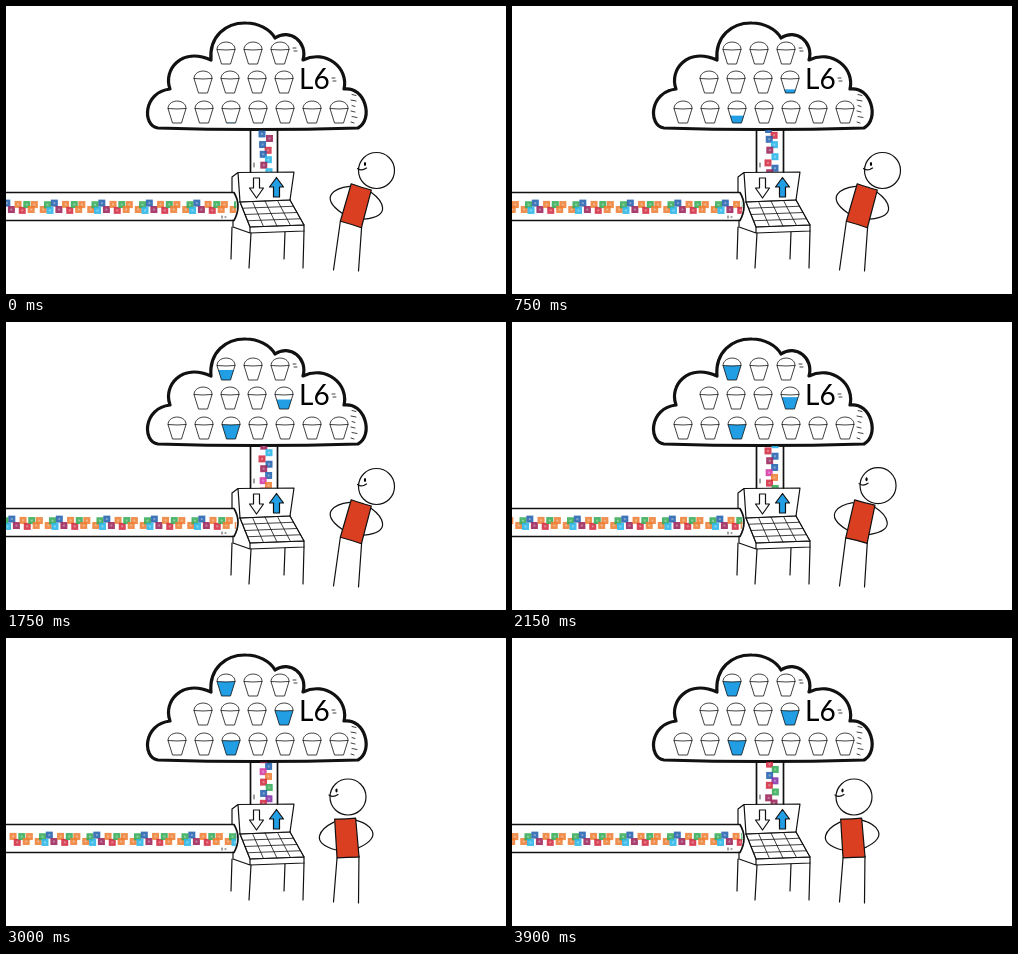
Recreate the animation shown at these times as an HTML page. Size 500 by 288 pixels, loop 3.95 s.

```html
<!DOCTYPE html>
<html lang="en">
<head>
<meta charset="utf-8">
<title>Cloud buckets</title>
<style>
html, body { margin: 0; width: 100%; height: 100%; overflow: hidden; background: #fff; }
svg { display: block; width: 500px; height: 288px; }
text { font: 28px Lato, "Open Sans", sans-serif; }
.ink { fill: none; stroke: #111; stroke-width: 1.2; stroke-linecap: round; stroke-linejoin: round; }
.cloud { stroke-width: 3.2; }
.pipe { stroke-width: 1.7; }
.faint { stroke-width: .8; }
.blue { fill: #229fe4; }
.red { fill: #d93f20; }
</style>
</head>
<body>
<svg viewBox="0 0 500 288">
  <defs>
    <clipPath id="flat"><path d="M0 187H228Q233 200 228 213H0Z"/></clipPath>
    <clipPath id="upright"><path d="M245 124H271V166H245Z"/></clipPath>
    <clipPath id="body"><path d="M-9-3.5H9L4.5 11H-4.5Z"/></clipPath>
    <path id="bucket" class="ink faint" d="M-9-3.5C-9-13.500 9-13.500 9-3.500L4.500 11H-4.500L-9-3.500Q0-2.500 9-3.500"/>
    <path id="arm" class="ink" d="M11-36C24-31 39-18 11-8"/>
  </defs>

  <path class="ink cloud" d="M152 122C136 120 137 86 164 83C157 64 175 41 205 54C203 30 220 16.500 240 17C252 17 264 23 269 32C284 22 302 36 297 54C320 43 343 62 338 83C359 80 368 113 352 122Q250 125 152 122Z"/>
  <path class="ink faint" d="M287 42h3M288 45h3M326 72h3M327 75h3"/>
  <path class="ink faint" id="hatch"/>
  <text x="293" y="83">L6</text>
  <g id="buckets"></g>

  <g clip-path="url(#upright)"><g id="column"></g></g>
  <path class="ink pipe" d="M244.500 124V166M271.500 124V166"/>
  <path class="ink faint" d="M248 157v4"/>

  <g clip-path="url(#flat)"><g id="row"></g></g>
  <path class="ink pipe" d="M0 186.500H228Q236 200 228 214.500H0"/>
  <path class="ink faint" d="M216 210v2M219 211h1"/>

  <path class="ink" d="M226 221L225 253M245 227L243 262M279 226L278 253M298 225L297 262"/>
  <path class="ink" d="M226 186V171L232 166.500L288 166L284 194L234 196L232 166.500"/>
  <path class="ink" d="M234 196L244 221L298 219V225L244 227L227 221V214M244 221V227M284 194L298 219"/>
  <path class="ink faint" id="keys"/>
  <path class="ink" d="M247.500 172H253.500V182H257.500L250.500 192L243.500 182H247.500Z"/>
  <path class="ink blue" d="M270.500 171.500L277.500 181H273.500V191H267.500V181H263.500Z"/>

  <path class="ink" id="legs"/>
  <g id="torso">
    <use href="#arm"/><use href="#arm" transform="scale(-1 1)"/>
    <path class="ink red" d="M-10-39Q0-38 11-38L11 1Q0 0-11 0Z"/>
  </g>
  <g id="head">
    <circle class="ink" r="18" fill="none"/>
    <ellipse cx="-11.500" cy="-6.500" rx="1.100" ry="2"/>
    <path class="ink" d="M-19-2Q-15 1-10-2.500"/>
  </g>
</svg>
<script>
const LOOP = 3950, STEP = 50, PERIOD = 47.5, GAP = 27;
const COLORS = ["#8431a8", "#d33aa2", "#d32c42", "#ee7f35", "#35ac58", "#29b5e8", "#2462b0", "#9b2459"];
const get = id => document.getElementById(id);
const set = (id, name, value) => get(id).setAttribute(name, value);
const clamp = v => Math.max(0, Math.min(1, v));
const mix = (a, b, k) => a + (b - a) * k;

function add(parent, name, attrs) {
  const node = document.createElementNS(parent.namespaceURI, name);
  for (const key in attrs) node.setAttribute(key, attrs[key]);
  return parent.appendChild(node);
}

function seeded(seed) {
  return () => (seed = seed * 16807 % 2147483647) / 2147483647;
}

// Each row has one spot that may fill between two times.
const rows = [
  { x: 220, y: 47, count: 3, filling: 0, start: 800, end: 2150 },
  { x: 197, y: 76, count: 4, filling: 3, start: 50, end: 2600 },
  { x: 171, y: 106, count: 7, filling: 2, start: -100, end: 1520 }
];
for (const row of rows)
  for (let i = 0; i < row.count; i++) {
    const g = add(get("buckets"), "g", { transform: `translate(${row.x + i * GAP} ${row.y})` });
    if (i === row.filling) {
      const clip = add(g, "g", { "clip-path": "url(#body)" });
      row.level = add(clip, "rect", { class: "blue", x: -10, width: 20, height: 20 });
    }
    add(g, "use", { href: "#bucket" });
  }

function block(parent, x, y, random) {
  const fill = COLORS[Math.floor(random() * COLORS.length)];
  add(parent, "rect", { x: x - 3.5, y: y - 3.5, width: 7, height: 7, fill, opacity: .88 });
  add(parent, "rect", { x: x - 1, y: y - 1, width: 2, height: 2, fill: "#fff", opacity: .35 });
}

// Two loose clusters per period, the same in every period.
for (let p = -1; p < 5; p++) {
  const random = seeded(4217);
  for (let i = 0; i < 10; i++) {
    const x = (p + Math.floor(i / 5) / 2) * PERIOD + i % 5 * 4;
    block(get("row"), x + 12 + random() * 2, (i % 2 ? 203 : 197) + random() * 2, random);
  }
}

const random = seeded(91);
for (let i = 0; i < 22; i++)
  block(get("column"), (i % 2 ? 262 : 256) + random() * 2, 66 + i * 5.5 + random() * 2, random);

let hatch = "", keys = "";
for (let i = 0; i < 7; i++) hatch += `M${345 + i % 2} ${83 + i * 5.5}l${3 + i % 3} 1`;
set("hatch", "d", hatch);

const onPanel = (u, v) => `${mix(234, 284, u) + mix(10, 14, u) * v} ${mix(196, 194, u) + 25 * v}`;
for (let k = 0; k <= 1; k += .25)
  keys += `M${onPanel(k, 0)}L${onPanel(k, 1)}M${onPanel(0, k)}L${onPanel(1, k)}`;
set("keys", "d", keys);

// k runs from leaning back (0) to standing upright (1).
function drawMan(k) {
  const x = mix(345, 342, k), y = mix(218, 219, k), lean = mix(14.7, -5, k);
  const dx = 11 * Math.cos(lean * Math.PI / 180), dy = 11 * Math.sin(lean * Math.PI / 180);
  set("torso", "transform", `translate(${x} ${y}) rotate(${lean})`);
  set("legs", "d", `M${x - dx} ${y - dy}L327.5 264M${x + dx} ${y + dy}L352.5 265`);
  set("head", "transform", `translate(${mix(370.5, 342, k)} ${mix(164.5, 159, k)})`);
}

function draw(now) {
  const t = Math.floor(now % LOOP / STEP) * STEP;
  for (const { start, end, level } of rows)
    level.setAttribute("y", mix(11.5, -3.5, clamp((t - start) / (end - start))));
  set("row", "transform", `translate(${t * .03 % PERIOD} 0)`);
  set("column", "transform", `translate(0 ${(3000 - t) * .02})`);
  const k = clamp((t - 1950) / 800);
  drawMan(k * k * (3 - 2 * k));
}

const begin = performance.now();
function tick() {
  draw(performance.now() - begin);
  requestAnimationFrame(tick);
}
tick();
</script>
</body>
</html>
```
